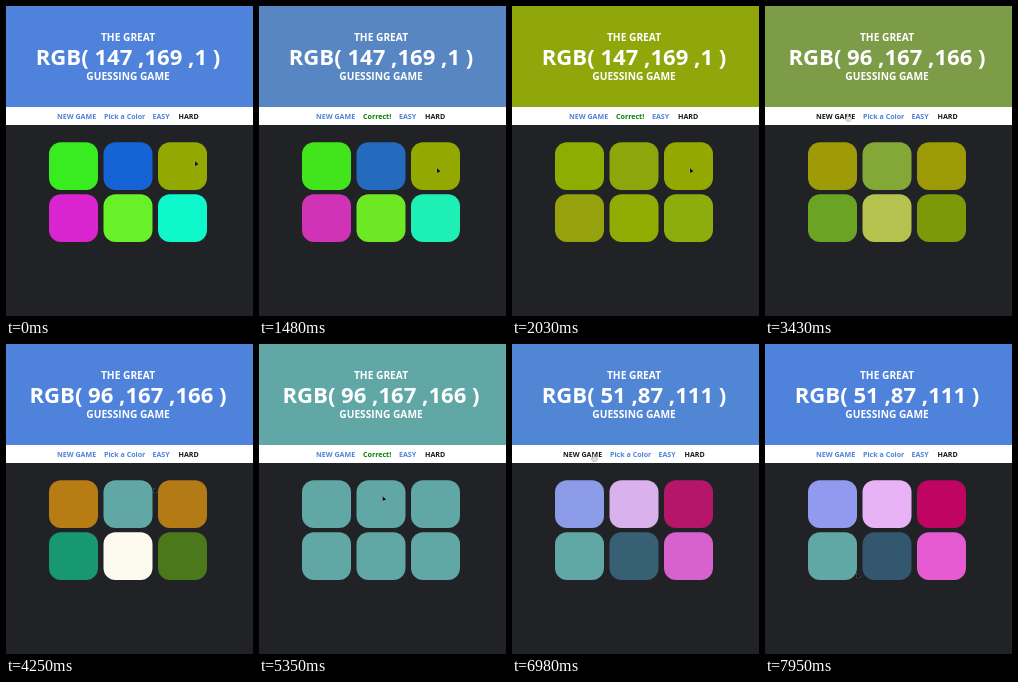
Recreate the animation shown at these times as an HTML page with a canvas. Size 247 px wide and 310 px high, loop 8000 ms.

```html
<!DOCTYPE html>
<html lang="en">
<head>
<meta charset="utf-8">
<title>RGB guessing game</title>
<style>
html, body { margin: 0; width: 100%; height: 100%; overflow: hidden; background: #212225; }
canvas { display: block; width: 247px; height: 310px; }
</style>
</head>
<body>
<canvas id="stage"></canvas>
<script>
const W = 247, H = 310, LOOP = 8000, FADE = 900;
const canvas = document.getElementById('stage');
const ctx = canvas.getContext('2d');
const scale = window.devicePixelRatio || 1;
canvas.width = Math.round(W * scale);
canvas.height = Math.round(H * scale);

const LINK = '#4f82db', DARK = '#212225', INK = '#181818';

// Each round: when it opens, when it is solved, the tile colours, the right tile
const rounds = [
  { open: -FADE, solved: 1380, answer: 2, tiles: ['#38ec20', '#1663d5', '#93a901', '#d924cf', '#68f028', '#0ef8cc'] },
  { open: 3240, solved: 4520, answer: 1, tiles: ['#b87c14', '#60a7a6', '#b37a16', '#189870', '#fdfaf0', '#4c781c'] },
  { open: 6435, solved: LOOP, answer: 4, tiles: ['#929af0', '#e8b2f6', '#c00462', '#60a7a6', '#33576f', '#e65ad2'] }
];

const channels = hex => [1, 3, 5].map(i => parseInt(hex.slice(i, i + 2), 16));
const lerp = (a, b, p) => a + (b - a) * p;

function mix(from, to, p) {
  const end = channels(to);
  return `rgb(${channels(from).map((v, i) => Math.round(lerp(v, end[i], p))).join(',')})`;
}

// A round fades in from the previous answer, then every tile takes its own answer
const scenes = rounds.flatMap((round, i) => {
  const last = rounds[Math.max(0, i - 1)];
  const prior = last.tiles[last.answer];
  const right = round.tiles[round.answer];
  const heading = `RGB( ${channels(right).join(' ,')} )`;
  return [
    { at: round.open, heading, won: false, head: [prior, LINK], tile: k => [prior, round.tiles[k]] },
    { at: round.solved, heading, won: true, head: [LINK, right], tile: k => [round.tiles[k], right] }
  ];
});

// Pointer moves: start, end, x, y
const home = [189, 155];
const moves = [
  [300, 580, 205, 176],
  [850, 1200, 178, 162],
  [2230, 2930, 81, 108],
  [4060, 4250, 148, 144],
  [4250, 4420, 130, 158],
  [5150, 6050, 80, 110],
  [7100, 7950, 92, 229]
];

// Solves the curve of the CSS "ease" keyword by bisection
function ease(x) {
  if (x <= 0) return 0;
  if (x >= 1) return 1;
  const curve = (a, b, s) => 3 * a * s * (1 - s) ** 2 + 3 * b * s * s * (1 - s) + s ** 3;
  let lo = 0, hi = 1;
  for (let i = 0; i < 24; i++) {
    const mid = (lo + hi) / 2;
    if (curve(0.25, 0.25, mid) < x) lo = mid; else hi = mid;
  }
  return curve(0.1, 1, lo);
}

function pointer(t) {
  let [x, y] = home;
  for (const [start, end, toX, toY] of moves) {
    const u = Math.max(0, Math.min(1, (t - start) / (end - start)));
    const p = u * u * (3 - 2 * u);
    x = lerp(x, toX, p);
    y = lerp(y, toY, p);
  }
  return [x, y];
}

function text(str, x, y, size, color, align = 'left') {
  ctx.font = `700 ${size}px "Open Sans", "Noto Sans", sans-serif`;
  ctx.textAlign = align;
  ctx.fillStyle = color;
  ctx.fillText(str, x, y);
}

function drawArrow(x, y) {
  ctx.beginPath();
  ctx.moveTo(x, y);
  ctx.lineTo(x, y + 5);
  ctx.lineTo(x + 3.6, y + 3.6);
  ctx.closePath();
  ctx.lineWidth = 0.8;
  ctx.strokeStyle = 'rgba(255,255,255,.35)';
  ctx.stroke();
  ctx.fillStyle = '#111';
  ctx.fill();
}

function drawHand(x, y) {
  ctx.beginPath();
  ctx.roundRect(x + 1, y, 1.4, 5, 0.7);
  ctx.roundRect(x, y + 3, 5, 4, 1.5);
  ctx.lineWidth = 0.8;
  ctx.strokeStyle = '#777';
  ctx.stroke();
  ctx.fillStyle = '#ddd';
  ctx.fill();
}

function drawNav(won, hover, left) {
  ctx.fillStyle = '#fff';
  ctx.fillRect(0, 101, W, 18);
  const item = (str, x, color) => text(str, x, 113, 7.1, color);
  item('NEW GAME', left, hover ? INK : LINK);
  item(won ? 'Correct!' : 'Pick a Color', left + 47, won ? '#008000' : LINK);
  const easy = won ? 140 : 146.5;
  item('EASY', easy, LINK);
  item('HARD', easy + 26, INK);
}

function draw(t) {
  const scene = scenes.findLast(s => s.at <= t);
  const p = ease((t - scene.at) / FADE);

  ctx.setTransform(scale, 0, 0, scale, 0, 0);
  ctx.fillStyle = DARK;
  ctx.fillRect(0, 0, W, H);
  ctx.fillStyle = mix(...scene.head, p);
  ctx.fillRect(0, 0, W, 101);

  text('THE GREAT', 122, 35, 10.2, '#fff', 'center');
  text(scene.heading, 122, 58.5, 22.1, '#fff', 'center');
  text('GUESSING GAME', 122, 73.5, 10.2, '#fff', 'center');

  const [mx, my] = pointer(t);
  const left = scene.won ? 57 : 51;
  const hover = mx > left - 3 && mx < left + 42 && my > 101 && my < 119;
  drawNav(scene.won, hover, left);

  for (let k = 0; k < 6; k++) {
    ctx.fillStyle = mix(...scene.tile(k), p);
    ctx.beginPath();
    ctx.roundRect(43 + (k % 3) * 54.5, 136.3 + Math.floor(k / 3) * 52, 49, 47.8, 12);
    ctx.fill();
  }

  if (hover) drawHand(mx, my);
  else drawArrow(mx, my);
}

function tick() {
  draw(performance.now() % LOOP);
  requestAnimationFrame(tick);
}
tick();
</script>
</body>
</html>
```
